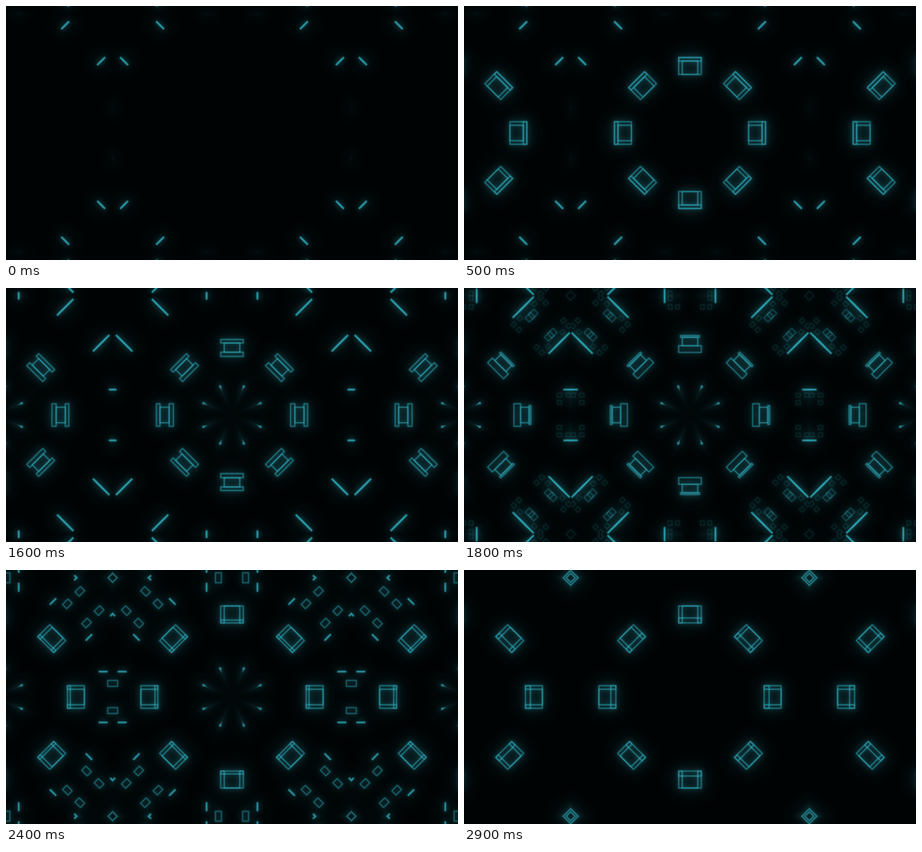
An HTML page with a canvas that plays this animation: 640x360 px, repeating every 3 s.

```html
<!DOCTYPE html>
<html lang="en">
<head>
<meta charset="utf-8">
<title>Kaleidoscope</title>
<style>
html, body { margin: 0; width: 100%; height: 100%; overflow: hidden; background: #000304; }
canvas { display: block; }
</style>
</head>
<body>
<canvas id="stage" width="640" height="360"></canvas>
<script>
const LOOP = 3000, STEP = 100;
const TILE = 338, HALF = TILE / 2;
const SCALE = 2, PAD = 40, SCENE_W = 275, SCENE_H = 170;
const BG = '#000304', INK = 'rgb(42,150,162)';

const layer = (w, h) => {
  const c = document.createElement('canvas');
  c.width = w;
  c.height = h;
  return c.getContext('2d');
};
const stage = document.getElementById('stage').getContext('2d');
const ink = layer(SCENE_W * SCALE, SCENE_H * SCALE);
const scene = layer(SCENE_W * SCALE, SCENE_H * SCALE);
const tile = layer(TILE, TILE);

let now = 0;
const ramp = (from, to) => {
  const p = Math.min(1, Math.max(0, (now - from) / (to - from)));
  return p * p * (3 - 2 * p);
};

function box(left, right, low, high, alpha = .75) {
  if (alpha < .01) return;
  ink.globalAlpha = alpha;
  ink.lineWidth = 1.7;
  ink.strokeRect(left, low, right - left, high - low);
}

function dash(mid, half, y, alpha) {
  if (alpha < .01 || half <= 0) return;
  ink.globalAlpha = alpha;
  ink.lineWidth = 2.5;
  ink.beginPath();
  ink.moveTo(mid - half, y);
  ink.lineTo(mid + half, y);
  ink.stroke();
}

// Framed plate whose inner dividers slide while it moves outward
function drawPlate() {
  const grow = ramp(0, 400), lift = ramp(1600, 2000);
  const base = 83 + 22 * ramp(1600, 2200), depth = 24;
  const near = base + 6 * ramp(600, 1100) + 7 * lift - 9 * ramp(2000, 2400) + 3 * ramp(2400, 2900);
  const far = base + 19 + 5 * lift;
  const waist = 11 + 5 * (ramp(600, 1000) - ramp(1250, 1600));
  const frame = 1 - ramp(1250, 1600) + ramp(2000, 2400);
  const cap = 16 - 5 * lift, gap = 27 * lift - 16;
  const alpha = .72 * grow;

  ink.save();
  ink.translate(95, 0);
  ink.scale(grow, grow);
  ink.translate(-95, 0);
  box(base, base + depth, -16, 16, alpha * frame);
  box(near, far, -waist, waist, alpha);
  box(far, base + depth, -cap, cap, alpha);
  if (near > base + 1) box(base, near, gap, 16, alpha);
  ink.restore();
}

// Dash, box and grid cells that split into two mirrored halves
function drawCluster() {
  const split = ramp(1600, 2200), leave = ramp(2400, 2800);
  const flash = ramp(1600, 2000) - ramp(2000, 2300);
  const half = 8 + 8.5 * ramp(1200, 1600) - 10 * ramp(1600, 2400);
  const size = 5.5 * ramp(700, 1200);
  const show = ramp(700, 1200) - ramp(1200, 1550) + ramp(1600, 1950) - leave;

  for (const side of [-1, 1]) {
    dash(180 + side * 24.5 * split, half, 36, 1 - leave);
    const mid = 180 + side * 12.5 * split;
    box(mid - size, mid + size, 15, 23.5, .65 * show);
    for (let col = 0; col < 2; col++)
      for (let row = col; row < 2; row++) {
        const u = 180 + side * (30 - 12.5 * col), v = 15 + 10.5 * row;
        box(u, u - side * 12.5 * flash, v, v + 10.5 * flash, .4 * flash);
      }
  }
}

function drawScene() {
  ink.setTransform(1, 0, 0, 1, 0, 0);
  ink.clearRect(0, 0, SCENE_W * SCALE, SCENE_H * SCALE);
  ink.setTransform(SCALE, 0, 0, SCALE, 0, PAD * SCALE);
  ink.strokeStyle = INK;
  drawPlate();
  drawCluster();
  box(234.5, 262, -16, 16, .8 * ramp(1700, 2000));
  box(231.5, 262, -16, 16, .8 * ramp(2400, 2900));
  // Mostly hidden behind the wedge edge: only its corner and glow show
  box(5, 20 + 21 * ramp(700, 1600), 16, 32, ramp(700, 1600) - ramp(2400, 2800));

  scene.globalCompositeOperation = 'source-over';
  scene.globalAlpha = 1;
  scene.filter = 'none';
  scene.fillStyle = BG;
  scene.fillRect(0, 0, SCENE_W * SCALE, SCENE_H * SCALE);
  scene.globalCompositeOperation = 'lighter';
  const bloom = (radius, gain) => {
    scene.filter = `blur(${radius * SCALE}px)`;
    scene.globalAlpha = gain;
    scene.drawImage(ink.canvas, 0, 0);
  };
  bloom(.6, .8);
  bloom(4, .65);
  bloom(12, 1);
}

// Sixteen mirrored wedges make one square tile
function drawTile() {
  tile.fillStyle = BG;
  tile.fillRect(0, 0, TILE, TILE);
  const reach = 270, edge = Math.tan(Math.PI / 8) * reach;
  for (let i = 0; i < 16; i++) {
    tile.save();
    tile.translate(HALF, HALF);
    tile.rotate((i >> 1) * Math.PI / 4);
    if (i % 2) tile.scale(1, -1);
    tile.beginPath();
    tile.moveTo(-.5, -.4);
    tile.lineTo(reach, -.4);
    tile.lineTo(reach, edge + .4);
    tile.lineTo(-.5, .4);
    tile.clip();
    tile.drawImage(scene.canvas, 0, -PAD, SCENE_W, SCENE_H);
    tile.restore();
  }
}

function render() {
  drawScene();
  drawTile();
  for (let x = -1; x <= 1; x++)
    for (let y = -1; y <= 1; y++)
      stage.drawImage(tile.canvas, 320 - HALF + x * TILE, 180 - HALF + y * TILE);
}

const start = performance.now();
let shown = -1;
function tick() {
  now = Math.floor(((performance.now() - start) % LOOP) / STEP) * STEP;
  if (now !== shown) {
    shown = now;
    render();
  }
  requestAnimationFrame(tick);
}
tick();
</script>
</body>
</html>
```
